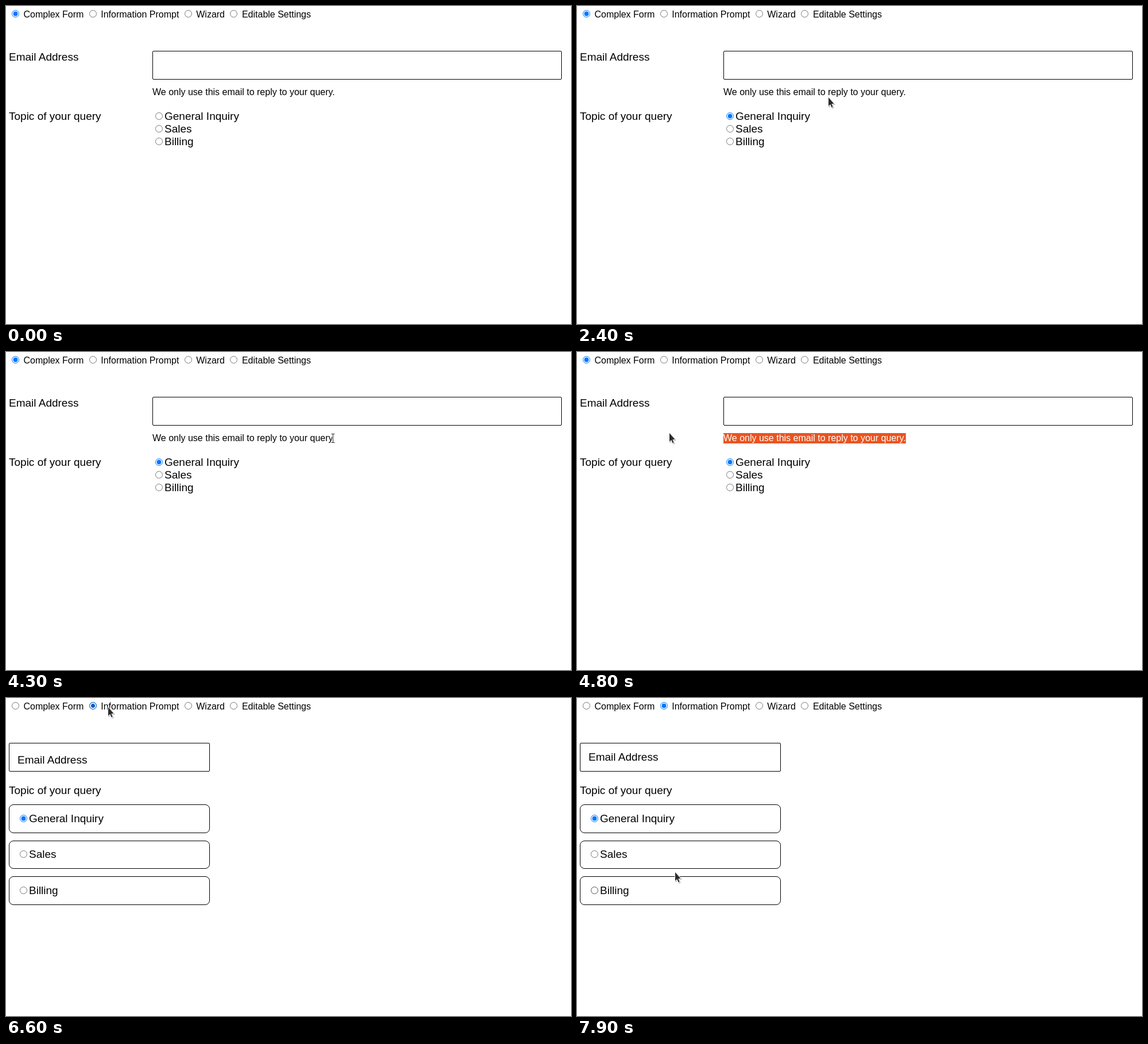
An HTML page for the animation above (8000 ms loop, 984 px wide and 553 px high).

```html
<!DOCTYPE html>
<html lang="en">
<head>
<meta charset="utf-8">
<title>Form layouts</title>
<style>
  html, body { margin: 0; width: 100%; height: 100%; overflow: hidden; background: #fff; }
  body { position: relative; color: #000; font: 16px "Liberation Sans", Arial, sans-serif; pointer-events: none; }
  .tabs, .t, .box, .sel, #cursor { position: absolute; white-space: nowrap; }
  .tabs { left: 5px; top: 4px; }
  /* --x is the left edge, --y the text baseline */
  .t { left: calc(var(--x) * 1px); top: calc(var(--y) * 1px - 20px); line-height: 0; }
  .t::before { content: ""; display: inline-block; height: 20px; }
  .big { font-size: 19px; }
  .box { box-sizing: border-box; left: 5px; top: 78px; width: 350px; height: 50px; border: 1px solid #000; border-radius: 2px; }
  .wide { left: 255px; width: 713px; }
  .option { top: calc(185.4px + var(--i) * 62.4px); height: 49.4px; border-radius: 8px; }
  .sel { left: 255px; top: 141px; height: 18px; background: #e95420; color: #fff; overflow: hidden; }
  .sel .t { position: relative; display: block; left: 0; top: -6px; }
  input { width: 13px; height: 13px; margin: 3px 3px 0 5px; }
  input.hover, input.press {
    --c: #4f4f4f; appearance: none; box-sizing: border-box; border: 1px solid var(--c);
    border-radius: 50%; background: #fff;
  }
  input.press { --c: #8d8d8d; }
  input.hover:checked { --c: #005cc8; background: var(--c); box-shadow: inset 0 0 0 2px #fff; }
  #cursor { left: 0; top: 0; overflow: visible; }
  #arrow { fill: #2b2b2b; stroke: #fff; stroke-width: 2; paint-order: stroke; stroke-linejoin: round;
    filter: drop-shadow(1px 1px .7px rgba(0, 0, 0, .3)); }
  #beam { fill: none; }
  [hidden] { display: none; }
</style>
</head>
<body>
<div class="tabs" id="tabs"></div>

<section id="form">
  <div class="t big" style="--x:5;--y:95">Email Address</div>
  <div class="box wide"></div>
  <div class="t" id="hint" style="--x:255;--y:155">We only use this email to reply to your query.</div>
  <div class="sel" id="sel"><span class="t">We only use this email to reply to your query.</span></div>
  <div class="t big" style="--x:5;--y:198">Topic of your query</div>
</section>

<section id="prompt" hidden>
  <div class="box"></div>
  <div class="t big" id="float" style="--x:20;--y:109">Email Address</div>
  <div class="t big" style="--x:5;--y:167">Topic of your query</div>
</section>

<svg id="cursor" width="1" height="1">
  <path id="arrow" d="M1 1V16L4.2 13L6.6 18.5L8.6 17.6L6.4 12.3L10.6 12Z"/>
  <g id="beam">
    <path d="M-3-7.5H3M0-7.5V7.5M-3 7.5H3" stroke="#fff" stroke-width="3"/>
    <path d="M-3-7.5H3M0-7.5V7.5M-3 7.5H3" stroke="#333"/>
  </g>
</svg>

<script>
const LOOP = 8000, STEP = 100;
const PICK = 1600, DRAG = 4400, DROP = 4800, CLEAR = 5600, SWITCH = 6600;

const $ = id => document.getElementById(id);
const add = (id, html) => $(id).insertAdjacentHTML("beforeend", html);
const radio = name => `<input type="radio" name="${name}">`;
const row = (name, text, x, y) =>
  `<label class="t big" style="--x:${x};--y:${Math.round(y)}">${radio(name)}${text}</label>`;

for (const text of ["Complex Form", "Information Prompt", "Wizard", "Editable Settings"])
  add("tabs", `${radio("tab")} <label>${text}</label> `);

["General Inquiry", "Sales", "Billing"].forEach((text, i) => {
  add("form", row("topic", text, 255, 198 + 22 * i));
  add("prompt", `<div class="box option" style="--i:${i}"></div>`);
  add("prompt", row("option", text, 19, 216 + 62.4 * i));
});

const [tabs, topics, options] = ["tab", "topic", "option"].map(n => [...document.getElementsByName(n)]);
options[0].checked = true;

// Where the pointer turns or stops: arrival time, x, y, rest
const stops = [
  [400, 121, 457],
  [1100, 291, 203, 100],
  [1500, 288, 190],
  [1900, 300, 209, 100],
  [2400, 437, 158, 100],
  [2800, 686, 150],
  [3200, 242, 187],
  [3500, 452, 127],
  [3800, 405, 179],
  [4300, 569, 150],
  [4800, 160, 140, 200],
  [5400, 336, 148, 100],
  [6000, 129, 2],
  [6200, 177, 15, 700],
  [7400, 230, 427],
  [7800, 168, 386],
  [7900, 170, 302]
];

const ease = k => k * k * (3 - 2 * k);

function pointerAt(t) {
  const i = Math.max(1, stops.findIndex(s => s[0] >= t));
  const [t0, x0, y0, rest = 0] = stops[i - 1], [t1, x1, y1] = stops[i];
  const k = ease(Math.max(0, (t - t0 - rest) / (t1 - t0 - rest)));
  return [x0 + (x1 - x0) * k, y0 + (y1 - y0) * k].map(Math.round);
}

const inside = (x, y, l, t, r, b) => x >= l && x < r && y >= t && y < b;

function hovered(x, y, prompt) {
  if (inside(x, y, 145, 5, 302, 23)) return tabs[1];
  return prompt
    ? x < 355 && options[Math.floor((y - 174.8) / 62.4)]
    : inside(x, y, 255, 179, 407, 245) && topics[Math.floor((y - 179) / 22)];
}

function overText(x, y, prompt) {
  return prompt ? inside(x, y, 5, 78, 355, 128)
    : inside(x, y, 255, 78, 968, 128) || inside(x, y, 255, 141, 573, 158);
}

// Left edge of every character in the hint, for whole-letter selection
function letterEdges() {
  const node = $("hint").firstChild, range = document.createRange();
  return [...node.data].map((_, i) => {
    range.setStart(node, i);
    range.setEnd(node, i + 1);
    return range.getBoundingClientRect().left;
  });
}
const edges = letterEdges();

function draw(t) {
  const prompt = t >= SWITCH, shown = t >= stops[0][0];
  const [x, y] = pointerAt(t);
  const hot = shown && hovered(x, y, prompt);
  const pressed = t === PICK - STEP || t === SWITCH - STEP;

  $("form").hidden = prompt;
  $("prompt").hidden = !prompt;
  tabs[prompt ? 1 : 0].checked = true;
  topics[0].checked = t >= PICK;
  for (const r of [...tabs, ...topics, ...options])
    r.className = r === hot ? (pressed ? "press" : "hover") : "";

  const selecting = t >= DRAG && t < CLEAR;
  $("sel").hidden = !selecting;
  if (selecting) {
    const [dragX] = pointerAt(Math.min(t, DROP));
    const edge = edges.find(e => e >= dragX - 4) ?? 573;
    $("sel").style.clipPath = `inset(0 0 0 ${edge - 255}px)`;
  }

  // The label settles into its field
  const rest = Math.max(0, 1 - (t - SWITCH) / 200);
  $("float").style.transform = prompt && rest ? `translateY(${4.6 * rest * rest}px)` : "";

  const beam = overText(x, y, prompt);
  $("cursor").style.visibility = shown ? "visible" : "hidden";
  $("arrow").style.display = beam ? "none" : "";
  $("beam").style.display = beam ? "" : "none";
  $("cursor").style.transform = `translate(${beam ? x + .5 : x}px, ${y}px)`;
}

const start = performance.now();
function tick() {
  const t = (performance.now() - start) % LOOP;
  draw(Math.floor(t / STEP) * STEP);
  requestAnimationFrame(tick);
}
tick();
</script>
</body>
</html>
```
